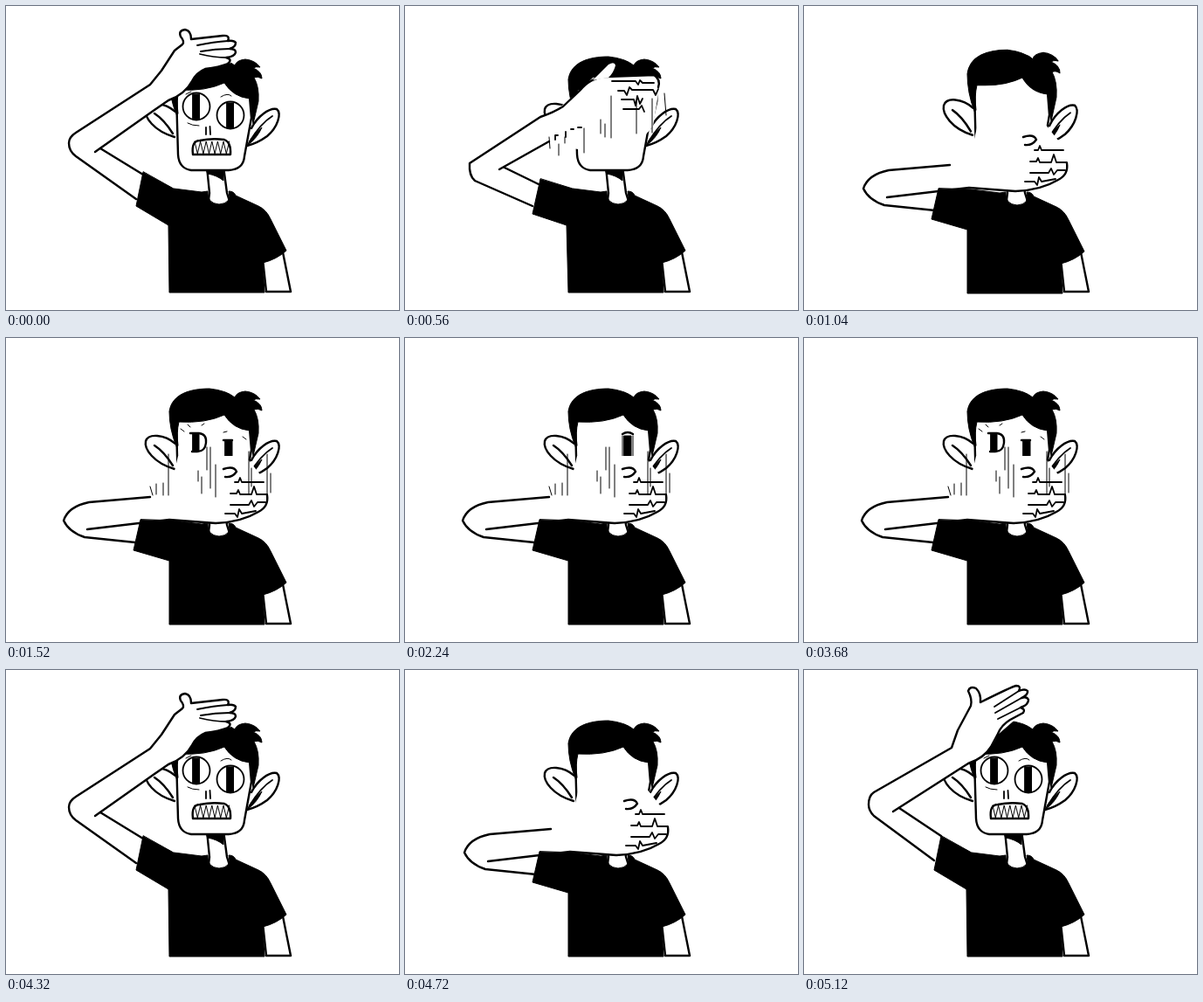
Write an HTML page that moves like this. It is 450 by 348 pixels and loops after 5.2 s.

```html
<!DOCTYPE html>
<html lang="en">
<head>
<meta charset="utf-8">
<title>Face wipe</title>
<style>
  html, body { margin: 0; width: 100%; height: 100%; overflow: hidden; background: #fff; }
  svg { display: block; width: 100vw; height: 100vh; }
  path, circle { fill: none; stroke: #000; stroke-width: 2.4; stroke-linecap: round; stroke-linejoin: round; }
  .skin { fill: #fff; }
  .ink { fill: #000; stroke-width: 1; }
  .cover { fill: #fff; stroke: none; }
  .thin { stroke-width: 1; }
  .mid { stroke-width: 1.8; }
  [data-show] { display: none; }
</style>
</head>
<body>
<svg viewBox="0 0 450 348">
  <!-- neck and far forearm -->
  <path class="skin" d="M230 184L233 214L231 230H258L253 214L249 184"/>
  <path class="ink" d="M230 188H249V200Q242 194 231 192Z"/>
  <path class="skin" d="M294 290L298 327H326L317 282"/>

  <g id="head">
    <path class="skin" d="M194 121C181 110 163 109 160 118C158 127 169 143 193 150"/>
    <path d="M170 123Q181 130 191 146"/>
    <path class="skin" d="M281 140C288 126 302 116 310 118C316 123 311 139 299 149Q288 157 276 160"/>
    <path class="mid" d="M305 126Q292 134 279 155"/>
    <path class="ink" d="M276 160Q280 150 293 139Q288 151 276 160Z"/>
    <path class="skin" d="M195 80V100L197 170Q198 186 212 188H255Q272 187 273 172L281 128L277 80Z"/>
    <path class="ink" d="M195 124Q187 104 187 84C190 64 211 58 233 58Q252 60 262 68Q264 62 274 61Q285 62 291 70Q286 69 283 71Q293 75 293 83Q288 80 284 82Q290 92 289 109L283 135L279 106Q260 104 250 88Q228 98 198 96Q195 108 197 123Z"/>

    <g data-show="face">
      <circle class="mid" cx="218" cy="115" r="15.5"/>
      <circle class="mid" cx="257" cy="125" r="15.5"/>
      <path class="ink" d="M214 101H221.500V130H214ZM253 111H260.500V140H253Z"/>
      <path class="thin" d="M206 101L212 98M246 104Q254 99 258 103M208 134Q213 137 221 137"/>
      <path class="mid" d="M229 139V147M233.500 138L234 147"/>
      <path class="skin" d="M214 170Q212 154 222 154Q236 151 250 153Q258 156 257 170Z"/>
      <path id="teeth" class="thin"/>
    </g>

    <g data-show="eyesPair">
      <path class="ink" d="M214 109H221V130H214ZM251 117H259V138H251Z"/>
      <path d="M211 109H221Q230 110 229 120Q228 130 219 130H213M249 117H259M249 138H259"/>
      <path class="thin" d="M200 104L204 107M208 99L211 102M224 100L227 98M249 108L253 107M271 113L275 116"/>
    </g>
    <g data-show="eyesBar">
      <path class="ink" d="M251 112H259V140H251Z"/>
      <path d="M249 110Q255 106 261 110M249 142Q255 146 261 142"/>
      <path class="thin" d="M249 112V140M261 112V140"/>
    </g>
    <g data-show="eyesRing">
      <path class="mid" d="M227 106Q219 111 220 123Q222 132 229 136M249 109Q254 114 253 121Q252 128 248 131"/>
      <path class="thin" d="M233 104L239 103"/>
    </g>
  </g>

  <g data-show="raised">
    <path class="cover" d="M149 218L80 167Q74 160 74 154Q74 145 80 140L169 89L176 69L192 37L203 37L245 20L256 28L253 47L222 74Q212 98 188 107L102 161L157 190Z"/>
    <path class="skin" d="M102 162L188 107Q206 101 214 88L222 73Q226 63 236 57L251 49Q254 45 248 43Q257 40 257 34Q255 30 249 32Q257 28 256 24Q253 21 246 24Q249 18 243 18Q238 19 202 37Q203 27 197 21Q190 18 188 24Q193 34 191 41L176 69L169 89L80 140Q74 144 74 154Q74 161 80 167L149 218"/>
    <path d="M109 158L157 190"/>
    <path class="mid" d="M218 42L246 24M219 49L249 32M222 56L248 43"/>
  </g>
  <g data-show="pat">
    <path class="cover" d="M149 221L80 172Q72 166 72 157Q73 149 80 145L165 90L193 51L213 39L254 35L263 48L258 65L222 74L186 108L102 166L157 193Z"/>
    <path class="skin" d="M102 167L170 119L186 108Q205 101 213 86Q218 76 228 72Q244 70 254 66Q260 61 252 59Q262 58 263 53Q263 49 256 49Q263 47 263 42Q261 39 254 40Q257 33 248 34L212 38Q212 28 205 27Q197 28 200 35Q205 41 202 44L193 51L178 74L165 90L80 145Q72 150 72 157Q72 166 80 172L149 221"/>
    <path d="M108 163L157 193"/>
    <path class="mid" d="M219 45Q238 41 254 40M223 52Q240 49 256 49M222 55Q238 59 252 59"/>
  </g>

  <g data-show="rise">
    <path class="cover" d="M146 229L85 203Q73 198 74 180L155 127L170 122L200 97L215 82L285 79L291 85L290 100L284 138L273 150L271 168L205 165L192 163L165 155L108 187L155 205Z"/>
    <path d="M146 229L80 200Q73 194 74 180L155 127Q170 122 181 115L200 97Q212 82 230 81L285 79Q293 84 290 93M165 155L108 187M114 185L155 205"/>
    <path class="cover" d="M215 85L233 67Q240 63 241 68Q239 76 233 82Z"/>
    <path class="mid" d="M237 86L264 86L267 90L269 85L272 88H285M244 97H251L254 102L257 93L260 96H284L287 102L290 95M248 107H262L264 114L266 103L269 112L272 106M250 118H268L271 114L274 121M172 153V148H175M184 150V144M190 141H193M198 139H202"/>
    <path class="thin" d="M165 150L166 163M176 158V171M183 150V157M205 140V168M224 130V146M229 135V150M236 103V151M265 108V146M283 106V145M297 100L299 125"/>
  </g>

  <g id="mouthArm" data-show="mouth">
    <path class="cover" d="M148 234L90 228Q72 222 66 209Q70 193 95 188L165 182L190 165L197 135H274L298 165L299 182Q299 193 289 199Q270 212 240 212L187 208L152 212Z"/>
    <path d="M148 234L90 228Q72 222 66 209Q71 193 95 188L165 182M93 219L152 212L187 208L240 212Q269 211 289 199Q301 193 299 180"/>
    <path d="M249 150Q261 146 264 153Q259 160 251 159"/>
    <path class="mid" d="M262 165H266L268 160L270 165H295M257 178H264L266 174L268 179H281L284 170L287 179H299M257 191H278L281 186L284 193L288 188H297M251 201H262L265 205L267 196L270 201L286 198"/>
  </g>
  <path data-show="streaks" class="thin" d="M165 170L168 180M172 167V179M180 166V180M186 133V180M220 152V164M224 159V178M230 125V151M234 125V172M240 145V182M278 130V178M281 149V170M299 133V187M303 155V177"/>

  <path id="shirt" class="ink"/>
</svg>

<script>
  const STEP = 80, LOOP = 5200, CYCLE = 9;
  const LAST_START = 54;
  const LAST_PHASES = [0, 1, 2, 3, 3, 3, 4, 5, 6, 7, 8];
  const POSES = ["pat", "mouth", "mouth", "mouth", "mouth", "mouth", "rise", "rise", "raised"];
  const SMEARED_EYES = ["eyesPair", "eyesPair", "eyesPair", "eyesBar", "eyesRing", "eyesPair", "eyesPair"];
  // sleeve: shoulder, cuff, armpit
  const SLEEVES = {
    raised: "157 190L149 229L186 251",
    pat: "157 190L149 229L186 251",
    rise: "155 198L146 238L185 251",
    mouth: "154 208L146 243L187 255"
  };
  const byId = id => document.getElementById(id);
  const parts = [...document.querySelectorAll("[data-show]")];
  const shirt = byId("shirt"), head = byId("head"), mouthArm = byId("mouthArm");

  byId("teeth").setAttribute("d", "M" + Array.from({ length: 13 }, (_, i) =>
    `${216 + i * 3.3} ${i % 2 ? 169 : 155}`).join("L"));

  function shirtPath(pose) {
    return `M${SLEEVES[pose]}L187 328H296L294 294Q310 290 321 280L303 244Q298 233 289 229` +
      `L263 217Q261 212 255 212Q259 226 244 227Q230 226 231 212L224 213L192 209Z`;
  }

  function draw(frame) {
    const last = frame >= LAST_START;
    const phase = last ? LAST_PHASES[frame - LAST_START] : frame % CYCLE;
    const cycle = Math.floor(Math.min(frame, LAST_START) / CYCLE);
    const pose = POSES[phase];
    const shown = new Set([pose]);
    if (pose === "pat" || pose === "raised") shown.add("face");
    if (phase === 1) shown.add("streaks").add(SMEARED_EYES[cycle]);

    for (const part of parts) part.style.display = shown.has(part.dataset.show) ? "inline" : "none";
    const pull = phase === 4;
    shirt.setAttribute("d", shirtPath(pose));
    shirt.setAttribute("transform", pull ? "translate(0 1)" : "");
    head.setAttribute("transform", pull ? "translate(0 188) scale(1 1.06) translate(0 -188)" : "");
    mouthArm.setAttribute("transform", phase > 1 ? "translate(2 0)" : "");
  }

  let current = -1;
  const start = performance.now();
  function tick() {
    const frame = Math.floor(((performance.now() - start) % LOOP) / STEP);
    if (frame !== current) draw(current = frame);
    requestAnimationFrame(tick);
  }
  tick();
</script>
</body>
</html>
```
